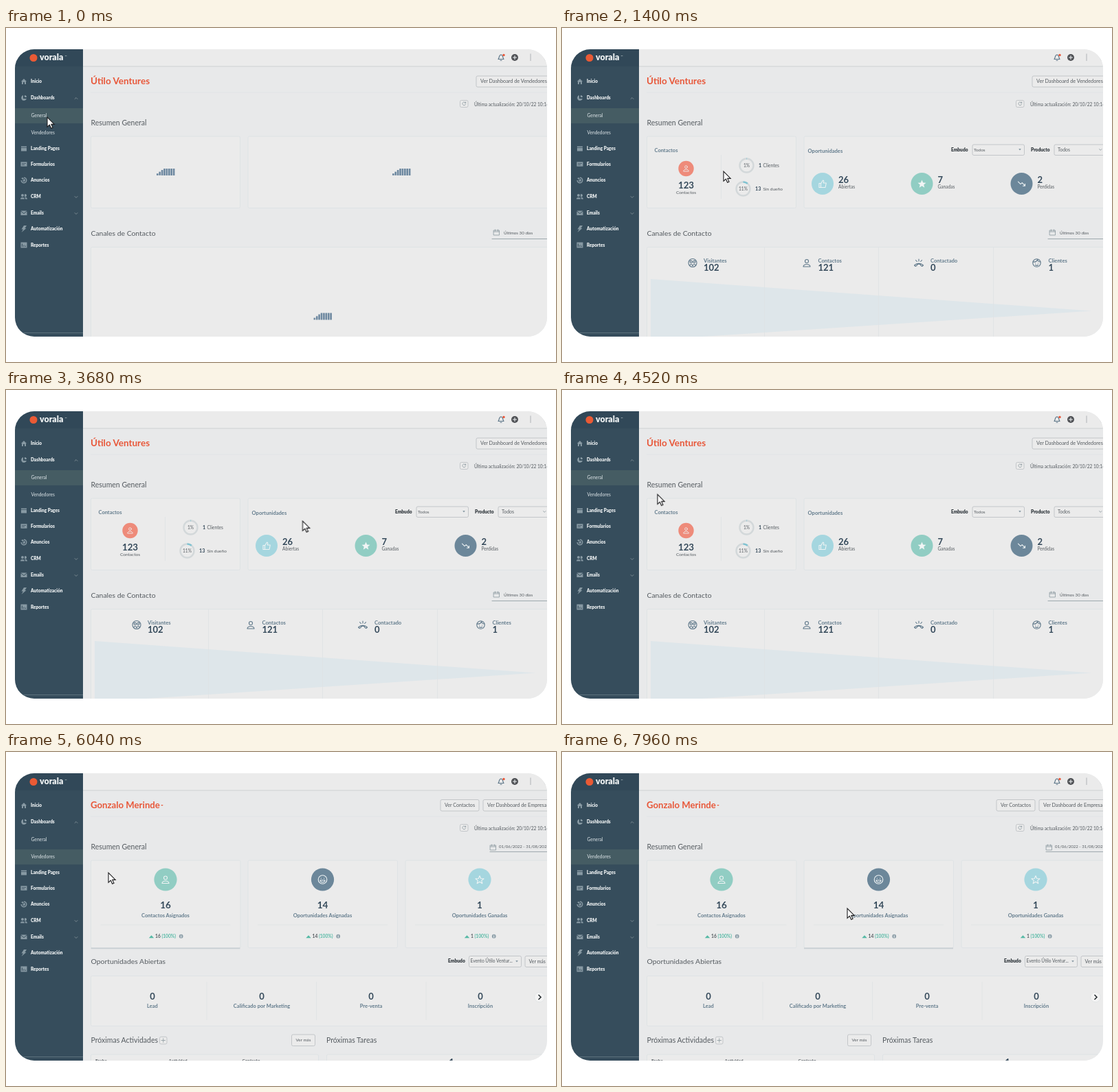
Animation of 800 by 487 pixels, one loop 8000 ms. Source, as an HTML page:

```html
<!DOCTYPE html>
<html lang="es">
<head>
<meta charset="utf-8">
<title>Dashboard</title>
<style>
html, body { margin: 0; width: 100%; height: 100%; overflow: hidden; background: #fff; }
svg { display: block; width: 800px; height: 487px; }
text { font-family: Lato, "Open Sans", sans-serif; fill: #555b60; }
.b { font-weight: 700; }
.k { font-weight: 900; fill: #2b3238; }
.slate { font-weight: 700; fill: #627b8c; }
.num { font-weight: 700; fill: #34495a; }
.title { font-weight: 700; fill: #e8583a; }
.nav { font-weight: 900; fill: #f1f4f5; }
.sub { fill: #dfe6e9; }
.green { fill: #55b9a5; }
.card { fill: #ebebeb; stroke: #dbe1e4; stroke-width: .8; }
.box { fill: #ebebeb; stroke: #b9bdc0; stroke-width: .8; }
.line { fill: none; stroke: #dfe2e4; stroke-width: .8; }
.icon { fill: none; stroke: #5d7688; stroke-width: 1.1; stroke-linecap: round; stroke-linejoin: round; }
.white { stroke: #eef3f4; }
.thin { stroke: #8b989f; stroke-width: .8; }
.side { fill: #8799a3; }

.general, .loadCards, .loadFunnel, .cards, .channels, .wait, .seller, .hlSeller, .hover1, .hover2 {
  animation: 8s step-end infinite;
}
.general { animation-name: general; }
.loadCards { animation-name: loadCards; }
.loadFunnel { animation-name: loadFunnel; }
.cards { animation-name: cards; }
.channels { animation-name: channels; }
.wait { animation-name: wait; }
.seller { animation-name: seller; }
.hlSeller { animation-name: hlSeller; }
.hover1 { animation-name: hover1; }
.hover2 { animation-name: hover2; }
@keyframes general { 0% { opacity: 1 } 65%, 100% { opacity: 0 } }
@keyframes loadCards { 0% { opacity: 1 } 7.5%, 100% { opacity: 0 } }
@keyframes loadFunnel { 0% { opacity: 1 } 10.5%, 100% { opacity: 0 } }
@keyframes cards { 0% { opacity: 0 } 7.5%, 100% { opacity: 1 } }
@keyframes channels { 0% { opacity: 0 } 10.5%, 100% { opacity: 1 } }
@keyframes wait { 0% { opacity: 0 } 65% { opacity: 1 } 72%, 100% { opacity: 0 } }
@keyframes seller { 0% { opacity: 0 } 72%, 100% { opacity: 1 } }
@keyframes hlSeller { 0% { opacity: 0 } 59%, 100% { opacity: 1 } }
@keyframes hover1 { 0% { opacity: 0 } 75% { opacity: 1 } 98%, 100% { opacity: 0 } }
@keyframes hover2 { 0% { opacity: 0 } 98.5%, 100% { opacity: 1 } }

.bar { fill: #6d88a0; transform-box: fill-box; transform-origin: 50% 100%; animation: wave 1s linear infinite; }
@keyframes wave { 0%, 100% { transform: scaleY(.28) } 25%, 75% { transform: none } }
.funnel { fill: #dee6ea; transform-origin: 129px 411px; animation: grow 8s ease-out infinite; }
@keyframes grow { 0%, 10.5% { transform: scaleY(.05) } 16.5%, 100% { transform: none } }
.spin { transform-origin: 460.5px 121px; animation: spin 1s -.56s linear infinite; }
@keyframes spin { to { transform: rotate(360deg) } }
#cursor { animation: roam 8s ease-in-out infinite; }
@keyframes roam {
  0%, 10.5% { transform: translate(60px, 130px) }
  17.5% { transform: translate(235px, 209px) }
  21% { transform: translate(264px, 206px) }
  29% { transform: translate(402px, 202px) }
  35% { transform: translate(386px, 201px) }
  42% { transform: translate(426px, 192px) }
  46% { transform: translate(431.5px, 191px) }
  52.5% { transform: translate(228px, 160px) }
  60%, 70% { transform: translate(69px, 146px) }
  75.5% { transform: translate(149px, 176px) }
  86.5% { transform: translate(218px, 216px) }
  91% { transform: translate(197px, 221px) }
  96% { transform: translate(219px, 215px) }
  98% { transform: translate(312px, 193px) }
  99.5%, 100% { transform: translate(415px, 228px) }
}
</style>
</head>
<body>
<svg id="stage" viewBox="0 0 800 487"></svg>
<script>
const text = (x, y, s, size = 6.6, cls = '', anchor = 'start') =>
  `<text x="${x}" y="${y}" font-size="${size}" class="${cls}" text-anchor="${anchor}">${s}</text>`;
const mid = (x, y, s, size, cls) => text(x, y, s, size, cls, 'middle');
const rect = (x, y, w, h, cls = 'card', r = 2) =>
  `<rect x="${x}" y="${y}" width="${w}" height="${h}" rx="${r}" class="${cls}"/>`;
const disc = (x, y, r, fill) => `<circle cx="${x}" cy="${y}" r="${r}" fill="${fill}"/>`;
const ring = (x, y, r, cls = 'icon') => `<circle cx="${x}" cy="${y}" r="${r}" class="${cls}"/>`;
const path = (d, cls = 'icon', x = 0, y = 0) => `<path d="${d}" class="${cls}" transform="translate(${x} ${y})"/>`;
const group = (cls, ...parts) => `<g class="${cls}">${parts.flat().join('')}</g>`;

const person = (x, y, cls, s = 1) =>
  `<g transform="translate(${x} ${y}) scale(${s})">${ring(0, -2.5, 2.5, cls)}${path('M-5 5.5C-5 .8 5 .8 5 5.5Z', cls)}</g>`;
const STAR = 'M0-6 1.7-2 6-1.8 2.7.9 3.8 5.2 0 2.8-3.8 5.2-2.7.9-6-1.8-1.7-2Z';

const loader = (x, y) => Array.from({ length: 8 }, (_, i) =>
  `<rect class="bar" x="${x + i * 3.4}" y="${y}" width="2.6" height="10" style="animation-delay:${(i * .09 - 1).toFixed(2)}s"/>`).join('');

const calendar = (x, y) => path('M0 1H8V8H0ZM0 3H8M2 0V2M6 0V2', 'icon thin', x, y);
const arrowDown = (x, y) => path('M-1.8-1H1.8L0 1.4Z', 'side', x, y);

// Sidebar
const navItems = [
  [78, 'Inicio', 'M-4 0 0-4 4 0H3V4H1V1H-1V4H-3V0Z'],
  [102, 'Dashboards', 'M-1-4A4 4 0 1 0 4 1H-1ZM1-4V-1H4A3 3 0 0 0 1-4Z'],
  [176, 'Landing Pages', 'M-4-3.5H4V-2H-4ZM-4-1.3H4V3.5H-4Z'],
  [198.5, 'Formularios', 'M-4.5-3.3H4.5V3.3H-4.5ZM-3-1.3V-.5H3V-1.3ZM-3 .7V1.5H1V.7Z'],
  [222, 'Anuncios', 'M0-4.5A4.5 4.5 0 1 1-4.5 0L-3 0A3 3 0 1 0 0-3ZM-4-3 0 0-1-4ZM0-2A2 2 0 1 1-2 0Z'],
  [246, 'CRM', 'M-5 3.5C-5 .3 1 .3 1 3.5ZM-4-2A2 2 0 1 1 0-2 2 2 0 1 1-4-2M2 3.5C2 2 1.6 1.2 1 .8 3 .3 5 1.5 5 3.5ZM1-3.6A2 2 0 1 1 1-.2Z'],
  [269.5, 'Emails', 'M-4.5-3H4.5L0 .5ZM-4.5-2V3.5H4.5V-2L0 1.6Z'],
  [293, 'Automatización', 'M0-5H4L1.5-1H3.5L-3.5 5-1 .5H-3.5Z'],
  [316.5, 'Reportes', 'M-4.5-4H4.5V4H-4.5ZM-3-2V2.5H-2V-2ZM-.5 0V2.5H.5V0ZM2 1V2.5H3V1Z'],
];
const sidebar = group('',
  '<path d="M13 31H112V450H13Z" fill="#364d5c"/><path d="M13 31H112V56H13Z" fill="#314858"/>',
  group('general', '<path d="M13 117H112V139H13Z" fill="#455c63"/>'),
  group('hlSeller', '<path d="M13 142H112V164H13Z" fill="#455c63"/>'),
  disc(40, 43.5, 5.5, '#ea5a35'),
  text(49, 47.3, 'vorala', 12.4, 'nav'), text(85.5, 43, '™', 4, 'sub'),
  navItems.map(([y, label, d]) => path(d, 'side', 26, y) + text(36, y + 2.4, label, 6.5, 'nav')),
  text(36.5, 130.4, 'General', 6.7, 'sub'), text(36.5, 155.4, 'Vendedores', 6.6, 'sub'),
  path('M100 103.5 102 101.5 104 103.5M100 245.5 102 247.5 104 245.5M100 269.5 102 271.5 104 269.5', 'icon thin'),
  '<path d="M13 444.5H112" stroke="#667b86" stroke-width=".8"/>');

const header = group('',
  '<path d="M112 31H787V56H112Z" fill="#ebebeb"/><path d="M112 56H787" stroke="#cdd1d3"/>',
  path('M-4 3H4C2.5 1.5 3-3.5 0-3.5S-2.5 1.5-4 3ZM-1 4.8H1', 'icon', 720, 42.5), disc(724, 39.5, 1.7, '#e8583a'),
  disc(740, 43, 5, '#505256'), path('M737.5 43H742.5M740 40.5V45.5', 'icon white'),
  '<path d="M763 37.5V48" stroke="#a9adb0" stroke-width=".9"/>', disc(787, 44, 4.5, '#d5d9db'));

const updated = group('',
  rect(660.5, 105.5, 11.5, 10, 'box'), path('M2.1-1.3A2.4 2.4 0 1 0 2.3 .8M2.4-2.6V-1.1H.9', 'icon thin', 666.3, 110.4),
  text(681, 113.6, 'Última actualización: 20/10/22 10:16', 6.6));

// Company dashboard
const percent = (x, y, label, share) => ring(x, y, 10, 'icon') .replace('class="icon"', 'fill="none" stroke="#d3d8da" stroke-width="2.4"') +
  `<circle cx="${x}" cy="${y}" r="10" fill="none" stroke="#80c3d2" stroke-width="2.4" pathLength="100" stroke-dasharray="${share} 100" transform="rotate(-90 ${x} ${y})"/>` +
  mid(x, y + 2.3, label, 6.6);
const deal = (x, color, n, label, mark) =>
  disc(x, 227, 16, color) + mark + text(x + 23, 226, n, 13, 'num') + text(x + 23, 234.3, label, 6.6);
const channel = (x, label, n) => text(x, 341.6, label, 7.6, 'slate') +
  `<text x="${x}" y="353.6" font-size="13" class="num" data-count="${n}">${n}</text>`;

const general = group('general',
  text(123, 81.8, 'Útilo Ventures', 13.5, 'title'),
  rect(684, 70, 130, 16, 'box'), text(690, 80.4, 'Ver Dashboard de Vendedores', 7.3),
  text(123.5, 142, 'Resumen General', 10.5),
  rect(123.5, 158, 217, 104.5), rect(352, 158, 460, 104.5),
  text(123.5, 303, 'Canales de Contacto', 10.4),
  calendar(709.5, 294), text(724, 300.7, 'Últimos 30 días', 6.2), path('M707 307.5H787', 'icon thin'),
  rect(123.5, 319.5, 700, 150),
  group('loadCards', loader(219, 205), loader(562, 205)),
  group('loadFunnel', loader(447.5, 415.5)),
  group('cards',
    text(134.5, 181.2, 'Contactos', 7.5, 'slate'),
    disc(180.5, 205, 11.2, '#ee8b7a'), person(180.5, 204.5, 'icon white', .75),
    mid(180.5, 233.6, '123', 13.3, 'num'), mid(180.5, 241.6, 'Contactos', 6.5),
    path('M231.5 185V249', 'line'),
    percent(268.5, 200.5, '1%', 1), percent(263.5, 234.5, '11%', 11),
    text(286, 202.8, '1', 7.2, 'num'), text(292.5, 202.8, 'Clientes', 6.6),
    text(281, 236.8, '13', 7.2, 'num'), text(292.5, 236.8, 'Sin dueño', 6.5),
    text(357.5, 182.4, 'Oportunidades', 7.6, 'slate'),
    text(566, 179.6, 'Embudo', 6.6, 'k'), rect(597, 170, 75.5, 15.5, 'box'), text(599, 179.6, 'Todos', 6.4), arrowDown(666, 177),
    text(682, 179.6, 'Producto', 6.6, 'k'), rect(716, 170, 90, 15.5, 'box'), text(721, 179.6, 'Todos', 6.9),
    path('M781.5 176.5 783.3 178.3 785 176.5', 'icon thin'),
    deal(379, '#a5d6df', 26, 'Abiertas', path('M-5-1H-2.5V5H-5ZM-2.5-.5 .5-5.5C2-5.5 2-4 1.3-1.5H5.3L4 5H-2.5', 'icon white', 379, 227.5)),
    deal(523.5, '#91cdc3', 7, 'Ganadas', `<path d="${STAR}" fill="#f1f5f5" transform="translate(523.5 227.5)"/>`),
    deal(668.5, '#6c879a', 2, 'Perdidas', path('M-5-3-1.5 .5 .8-1.5 5 3M5 .2V3H2', 'icon white', 668.5, 227.2))),
  group('channels',
    '<path class="funnel" d="M129 366 770 412.5 129 455Z"/>',
    path('M294.5 320V450M460.5 320V450M627.5 320V450', 'line'),
    ring(190, 342.5, 6), ring(187.8, 341, 1.6), ring(192.3, 341, 1.6), path('M185.5 346.5C187 343.5 189 344 190 347 191 344 193.5 343.5 194.7 346.5'),
    channel(206, 'Visitantes', 102),
    person(356, 342.5, 'icon'), channel(372.5, 'Contactos', 121),
    path('M-6.5 3.5C-3-.2 3-.2 6.5 3.5L4.8 5 2.6 3.6V2.2C1 1.6-1 1.6-2.6 2.2V3.6L-4.8 5ZM0-5.5V-2.5M-4.5-4-2.7-2M4.5-4 2.7-2', 'icon', 519, 342.5),
    channel(536, 'Contactado', 0),
    ring(690.5, 342.5, 5.7), path('M685 341C689 341.5 691 339.5 691.5 337.5 692 340 694 341 696 341M688.5 345.5C690 346.7 691 346.7 692.5 345.5M688.7 343V343.1M692.5 343V343.1'),
    channel(707.5, 'Clientes', 1)));

// Loading screen
const wait = group('wait',
  '<path d="M112 56.5H787V450H112Z" fill="#e6e8ea"/>',
  '<circle cx="460.5" cy="121" r="7.7" fill="none" stroke="#c8cbc9" stroke-width="1.3"/>',
  '<path class="spin" d="M459.8 113.3A7.7 7.7 0 0 1 467.8 123.5" fill="none" stroke="#e9705c" stroke-width="1.4"/>');

// Seller dashboard
const summary = (i, x, cx, color, n, label, mark) => rect(x, 158, 217.5, 127.5) +
  (i < 3 ? group('hover' + i, `<path d="M${x} 286.3H${x + 217}" stroke="#cbd1d5" stroke-width="2"/>`) : '') +
  disc(cx, 186, 16.6, color) + mark + mid(cx, 228.4, n, 13.5, 'num') + mid(cx, 240.8, label, 7.5, 'slate') +
  path(`M${x + 14} 252H${x + 203}`, 'line') +
  `<path d="M-3.7 2.2H3.7L0-1.7Z" class="green" transform="translate(${cx - (n > 9 ? 20.5 : 18.5)} 269)"/>` +
  `<text x="${cx - (n > 9 ? 15 : 13)}" y="270.9" font-size="6.7" class="b">${n} <tspan class="green">(100%)</tspan></text>` +
  disc(cx + (n > 9 ? 22.7 : 20.7), 268.7, 2.9, '#8fa0aa') + path('M0-.2V1.4M0-1.5V-1.4', 'icon white', cx + (n > 9 ? 22.7 : 20.7), 268.7);
const stages = ['Lead', 'Calificado por Marketing', 'Pre-venta', 'Inscripción'];

const seller = group('seller',
  text(123, 81.8, 'Gonzalo Merinde', 13.2, 'title'), path('M-1.8-1 0 .8 1.8-1', 'title', 227, 78),
  rect(632, 69.5, 56, 16.5, 'box'), mid(660, 80.2, 'Ver Contactos', 7.1),
  rect(694, 69.5, 120, 16.5, 'box'), text(700, 80.2, 'Ver Dashboard de Empresa', 7.3),
  text(123.5, 142, 'Resumen General', 10.5),
  calendar(704.5, 135), text(717, 140.2, '01/06/2022 - 31/08/2022', 6.1), path('M704 145.5H787', 'icon thin'),
  summary(1, 123.5, 232, '#91cdc3', 16, 'Contactos Asignados', person(232, 186, 'icon white')),
  summary(2, 352, 460.5, '#6c879a', 14, 'Oportunidades Asignadas',
    ring(460.5, 186, 6.3, 'icon white') + path('M-3.5 1H3.5C3 5-3 5-3.5 1ZM-2.2-2V-1.7M2.2-2V-1.7', 'icon white', 460.5, 186)),
  summary(3, 581, 689, '#a5d6df', 1, 'Oportunidades Ganadas', path(STAR, 'icon white', 689, 186.5)),
  text(123.5, 309.3, 'Oportunidades Abiertas', 10.4),
  text(643, 307.4, 'Embudo', 6.7, 'k'), rect(673.5, 297.5, 76, 16, 'box'),
  text(675.5, 307.4, 'Evento Útilo Ventur...', 6.6), arrowDown(743, 305),
  rect(755, 297.5, 60, 16, 'box'), text(760.5, 307.6, 'Ver más', 7),
  rect(123.5, 326.5, 690, 73), path('M292 335V391M451.5 335V391M611 335V391', 'line'),
  stages.map((s, i) => mid(213 + i * 159, 360.8, 0, 13, 'num') + mid(213 + i * 159, 373, s, 7.5, 'slate')),
  disc(776, 357.5, 7.3, '#f3f3f3'), ring(776, 357.5, 7.3, 'line'),
  '<path d="M774.5 354 778 357.5 774.5 361" fill="none" stroke="#22282c" stroke-width="1.5"/>',
  text(123.5, 424, 'Próximas Actividades', 10.5),
  rect(223.5, 415.3, 10.5, 10.5, 'box'), path('M226 420.5H231.5M228.75 417.8V423.3', 'icon thin'),
  rect(415.5, 412, 34, 16.5, 'box'), mid(432.5, 422.4, 'Ver más', 6.3),
  text(466, 424, 'Próximas Tareas', 10.5),
  rect(123.5, 441, 331, 30), rect(466.5, 441, 350, 30),
  text(130, 452.4, 'Fecha', 6.4, 'b'), text(236.5, 452.4, 'Actividad', 6.4, 'b'), text(343.5, 452.4, 'Contacto', 6.4, 'b'),
  mid(648, 456.5, 1, 12.5, 'num'));

document.getElementById('stage').innerHTML = `
  <clipPath id="screen"><rect x="13" y="31" width="774" height="419" rx="28"/></clipPath>
  <g clip-path="url(#screen)">
    <path d="M13 31H787V450H13Z" fill="#e8e9ea"/>
    ${header}${path('M123 94H787', 'line')}${updated}${general}${seller}${wait}${sidebar}
    <path id="cursor" d="M0 0V14.2L3.4 11.2 5.7 16.2 8 15.2 5.8 10.4H10.2Z" fill="#fff" stroke="#1d1d1f" stroke-width="1.1"/>
  </g>`;

// Channel totals count up on the same clock as the pointer.
const clock = document.getElementById('cursor').getAnimations()[0];
const totals = document.querySelectorAll('[data-count]');
function tick() {
  const time = (clock.currentTime || 0) % 8000;
  const progress = Math.min(1, Math.max(0, (time - 840) / 480));
  for (const total of totals) {
    const value = String(Math.round(total.dataset.count * progress));
    if (total.textContent !== value) total.textContent = value;
  }
  requestAnimationFrame(tick);
}
tick();
</script>
</body>
</html>
```
